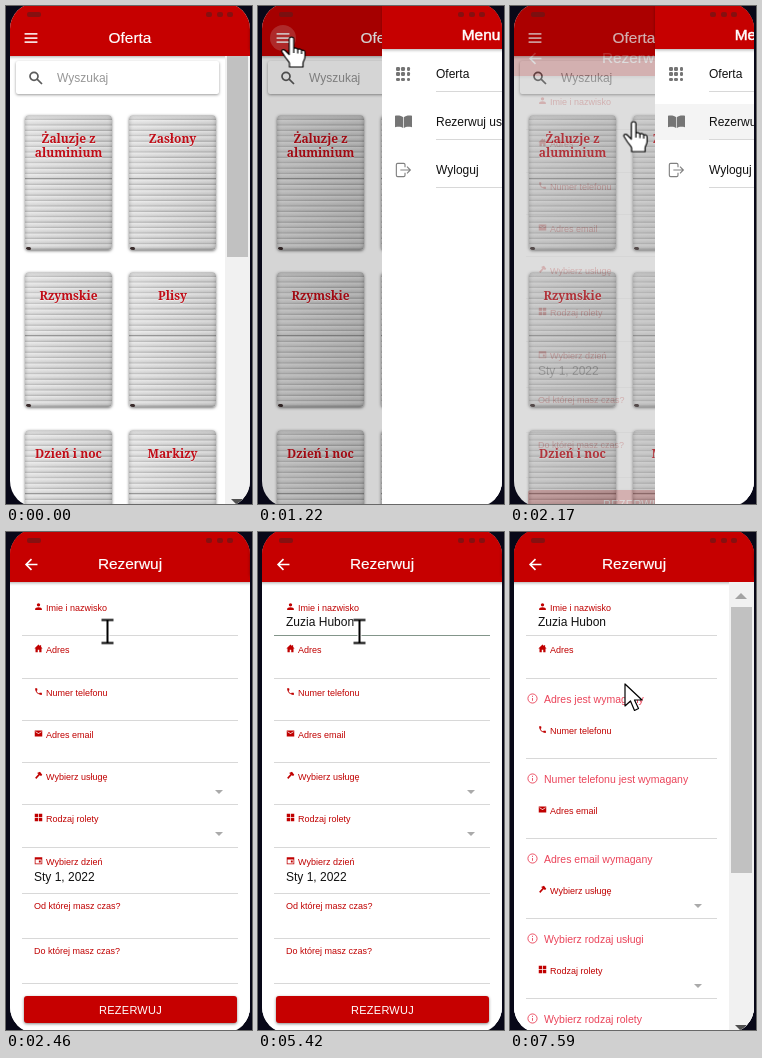
Recreate the animation shown at these times as an HTML page. Size 246 px wide and 498 px high, loop 8000 ms.

```html
<!DOCTYPE html>
<html lang="pl">
<head>
<meta charset="utf-8">
<title>Oferta</title>
<style>
@property --open { syntax: "<number>"; inherits: true; initial-value: 0; }

html, body { margin: 0; width: 100%; height: 100%; overflow: hidden; background: #080818; }
body { position: relative; font: 12px/16px "Liberation Sans", Arial, sans-serif; color: #111; }
div, svg { position: absolute; }
svg { overflow: visible; }

.phone {
  width: 246px; height: 498px; overflow: hidden;
  clip-path: inset(-3px 2px -3px 4px round 26px);
  animation: open 8s step-end infinite;
}
.page { inset: 0; background: #fff; overflow: hidden; }
.at { white-space: pre; }
.mid { transform: translateX(-50%); text-align: center; }
.header { left: 0; right: 0; top: 0; height: 50px; background: #c60000; box-shadow: 0 1px 3px #0005; }
.title { color: #fff; font-size: 15.4px; -webkit-text-stroke: .2px #fff; }
.strong { -webkit-text-stroke-width: .5px; }
.line { height: 1px; background: #d8d8d8; }

/* offer */
.search { left: 10px; top: 55px; width: 203px; height: 33px; border-radius: 2px; background: #fff; box-shadow: 0 1px 3px #0006; }
.hint { color: #979797; }
.card {
  width: 87px; height: 135px; border-radius: 4px; overflow: hidden;
  box-shadow: 0 1px 3px #0008, inset 0 0 4px #0004;
  background:
    linear-gradient(#0000 46.5%, #7779 46.5% 47.5%, #0000 47.5%),
    linear-gradient(100deg, #fff4, #fff0 45%, #0001),
    repeating-linear-gradient(#e6e6e6 0, #d2d2d2 3.2px, #b0b0b0 4.8px, #e6e6e6 5.4px);
}
.card::after { content: ""; position: absolute; left: 1px; bottom: 0; width: 5px; height: 3px; border-radius: 2px; background: #3a2c2c; }
.name { left: 0; right: 0; top: 17px; text-align: center; white-space: pre; font: bold 12px/14px "Noto Serif", serif; color: #c00d17; text-shadow: 0 1px 1px #fff9; }
.halo { left: 11.5px; top: 18.5px; width: 26px; height: 26px; border-radius: 50%; background: #fff3; animation: halo 8s step-end infinite; }
.track { left: 219px; top: 50px; width: 25px; bottom: 0; background: #f1f1f1; }
.thumb { left: 2px; width: 21px; background: #c1c1c1; }
.tri { width: 0; border: solid #0000; }

/* menu */
.dim { inset: 0; background: #000; opacity: calc(var(--open) * .27); }
.menu { left: 46px; top: 0; width: 198px; height: 498px; background: #fff; transform: translateX(calc((1 - var(--open)) * 198px)); }
.menu .header { height: 43px; }
.hover { left: 0; top: 98px; width: 198px; height: 36px; background: #f4f4f4; animation: row 8s step-end infinite; }
.status i { position: absolute; top: 5.5px; width: 6px; height: 5px; border-radius: 2px; background: #5a1a1a99; }
.status .pill { left: 21px; width: 14px; }

/* form */
.form { animation: form 8s step-end infinite; }
.errors { animation: errors 8s step-end infinite; }
.label { font-size: 9px; color: #c00000; }
.error { font-size: 10.5px; color: #eb445a; }
.focus { left: 16px; top: 103px; width: 216px; height: 1px; animation: focus 8s step-end infinite; }
.typed b { font-weight: normal; font-size: 0; animation: letter 8s step-end infinite; }
.caret { display: inline-block; width: 2px; height: 14px; margin-right: -2px; vertical-align: -3px; background: #111; animation: caret 8s step-end infinite; }
.button { left: 18px; top: 464px; width: 213px; height: 27px; border-radius: 3px; background: #c60000; box-shadow: 0 1px 3px #0007; animation: press 8s step-end infinite; }
.cta { color: #fff; font-size: 11px; letter-spacing: .25px; }

/* pointer */
.cursor { left: 0; top: 0; animation: move 8s ease-in-out infinite; }
.cursor path { stroke: #000; stroke-width: 1.2; stroke-linejoin: round; fill: #fff; }
.hand { animation: hand 8s step-end infinite; }
.beam { animation: beam 8s step-end infinite; }
.arrow { animation: errors 8s step-end infinite; }

@keyframes open {
  0% { --open: 0; } 14.375% { --open: .12; } 15.25% { --open: .606; } 16.125% { --open: .84; }
  17% { --open: .95; } 17.875% { --open: 1; }
  26.25% { --open: .86; } 27.125% { --open: .5; } 28% { --open: .18; } 28.875% { --open: .04; } 29.75%, 100% { --open: 0; }
}
@keyframes halo { 0% { opacity: 0; } 12.75% { opacity: 1; } 17.875%, 100% { opacity: 0; } }
@keyframes row { 0% { opacity: 0; } 22.2%, 100% { opacity: 1; } }
@keyframes form {
  0% { opacity: 0; transform: translateY(30px); }
  27.125% { opacity: .2; transform: translateY(20px); }
  28% { opacity: .6; transform: translateY(9px); }
  28.875% { opacity: .9; transform: translateY(3px); }
  29.75%, 100% { opacity: 1; transform: none; }
}
@keyframes errors { 0% { opacity: 0; } 80.375%, 100% { opacity: 1; } }
@keyframes focus { 0% { background: #0000; } 35.75% { background: #c4383a; } 44.375%, 100% { background: #83958a; } }
@keyframes letter { 0% { font-size: 12px; } 45%, 100% { font-size: 0; } }
@keyframes caret {
  0% { opacity: 0; } 35.75% { opacity: 1; } 42.625% { opacity: 0; } 44.375% { opacity: 1; }
  67.75% { opacity: 0; } 74.5%, 100% { opacity: 1; }
}
@keyframes press { 0% { background: #c60000; } 76.375%, 100% { background: #cb1414; } }
@keyframes hand { 0% { opacity: 1; } 29.75% { opacity: 0; } 76.375% { opacity: 1; } 80.375%, 100% { opacity: 0; } }
@keyframes beam { 0% { opacity: 0; } 29.75% { opacity: 1; } 76.375%, 100% { opacity: 0; } }
@keyframes move {
  0%, 3.9% { transform: translate(196px, 503px); }
  13.6%, 16.1% { transform: translate(33.5px, 31px); }
  23.9%, 26.25% { transform: translate(125.5px, 117px); }
  30.75%, 70.8% { transform: translate(101.5px, 99.5px); }
  74.5%, 76.2% { transform: translate(122px, 452px); }
  78.5%, 87% { transform: translate(127px, 488px); }
  89.75%, 91.2% { transform: translate(98px, 135px); }
  93.2% { transform: translate(111px, 158px); }
  94.8%, 100% { transform: translate(115px, 152px); }
}
</style>
</head>
<body>
<div class="phone">
  <div class="page" id="offer"></div>
  <div class="page form" id="form"></div>
  <div class="page errors" id="errors"></div>
  <div class="dim"></div>
  <div class="menu" id="menu"></div>
  <div class="status">
    <i class="pill"></i><i style="left:200px"></i><i style="left:211px"></i><i style="left:221px"></i>
  </div>
</div>
<div class="cursor">
  <svg class="hand" width="1" height="1">
    <path d="M-2.300 2.300a2.300 2.300 0 0 1 4.600 0V11.500c1.500-1 3.500-.5 4 1 1.500-1 3.300-.5 3.800 1 1.500-.7 3.400 0 3.400 2V20c0 3-2 4-2 6.500V30H-2v-3.500c0-2-3-4-5-7.500l-2.500-4c-1-2 1.500-3.500 3.200-1.500l4 4z"/>
    <path d="M2.300 12v4M6.300 13v3.500M10.100 14v3"/>
  </svg>
  <svg class="beam" width="1" height="1">
    <path d="M-6-11.5H6M0-11.5V11.5M-6 11.5H6" style="stroke:#fff;stroke-width:4"/>
    <path d="M-6-11.5H6M0-11.5V11.5M-6 11.5H6" style="stroke-width:2"/>
  </svg>
  <svg class="arrow" width="1" height="1">
    <path d="M0 0v22l5.500-5 4 9.500 4-2-4-8.500h7.500z"/>
  </svg>
</div>

<script>
// Icons on a 24-unit grid
const icons = {
  person: 'M12 12a4.500 4.500 0 1 0 0-9 4.500 4.500 0 0 0 0 9zm0 2c-5 0-9 2-9 5v2h18v-2c0-3-4-5-9-5z',
  home: 'M10 22v-7h4v7h6V12h3l-4-4V3h-3v2l-4-4L1 12h3v10z',
  phone: 'M6.600 10.800c1.400 2.800 3.800 5.100 6.600 6.600l2.200-2.200c.3-.3.7-.4 1-.2 1.100.4 2.300.6 3.600.6.6 0 1 .4 1 1V20c0 .6-.4 1-1 1C10.600 21 3 13.400 3 4c0-.6.4-1 1-1h3.500c.6 0 1 .4 1 1 0 1.200.2 2.400.6 3.600.1.3 0 .7-.2 1z',
  mail: 'M2 4h20v16H2zM4 8l8 5 8-5V6l-8 5-8-5z',
  hammer: 'M8 5l8-3 6 8-3 3-4-2L6 21l-3-3 9-10z',
  grid: 'M2 2h9v9H2zM13 2h9v9h-9zM2 13h9v9H2zM13 13h9v9h-9z',
  date: 'M2 3h20v19H2zM4 9h16v11H4zM13 12h5v5h-5z',
  book: 'M0 4c5-1 9 0 11.500 2v15c-3-2-7-2-11.500-1zM24 4c-5-1-9 0-11.500 2v15c3-2 7-2 11.500-1z'
};
const strokes = {
  exit: 'M15 8V4q0-2-2-2H4Q2 2 2 4v16q0 2 2 2h9q2 0 2-2v-4M8 12h15M18 7l5 5-5 5',
  search: 'M15 9.500a6 6 0 1 1-12 0 6 6 0 0 1 12 0zM14 14l7 7',
  info: 'M22 12a10 10 0 1 1-20 0 10 10 0 0 1 20 0zM12 11v6M12 6v2.500',
  bars: 'M1 5h22M1 12h22M1 19h22',
  back: 'M23 12H2M12 2L2 12l10 10'
};

// Helpers: x is the left edge (or the middle), y the middle of the line
const at = (x, y, cls, text) => `<div class="at ${cls}" style="left:${x}px;top:${y - 8}px">${text}</div>`;
const icon = (name, x, y, size, color, weight = 2) => {
  const paint = icons[name]
    ? `fill="${color}" fill-rule="evenodd"`
    : `fill="none" stroke="${color}" stroke-width="${weight}"`;
  return `<svg viewBox="0 0 24 24" width="${size}" height="${size}" style="left:${x - size / 2}px;top:${y - size / 2}px"><path d="${icons[name] || strokes[name]}" ${paint}/></svg>`;
};
const line = (x, y, w) => `<div class="line" style="left:${x}px;top:${y}px;width:${w}px"></div>`;
const tri = (x, y, w, h, color, up) => {
  const sides = up ? `0 ${w}px ${h}px` : `${h}px ${w}px 0`;
  return `<div class="tri" style="left:${x - w}px;top:${y - h / 2}px;border-width:${sides};border-${up ? 'bottom' : 'top'}-color:${color}"></div>`;
};
const header = (title, x, y = 32, cls = '') => `<div class="header"></div>` + at(x, y, `mid title ${cls}`, title);
const scrollbar = (top, height) =>
  `<div class="track"><div class="thumb" style="top:${top - 50}px;height:${height}px"></div></div>` +
  tri(231, 496, 6, 6, '#505050');
const label = (name, text, y) => name
  ? icon(name, 32.5, y - 1.5, 9, '#c00000') + at(40, y, 'label', text)
  : at(28, y, 'label', text);
const fill = (id, ...parts) => { document.getElementById(id).innerHTML = parts.flat().join(''); };

const cards = ['Żaluzje z\naluminium', 'Zasłony', 'Rzymskie', 'Plisy', 'Dzień i noc', 'Markizy'];
fill('offer',
  header('Oferta', 124),
  '<div class="halo"></div>',
  icon('bars', 25, 32, 14, '#f6dede', 3),
  '<div class="search"></div>',
  icon('search', 30, 72, 16, '#5c5c5c', 2.6),
  at(51, 72, 'hint', 'Wyszukaj'),
  cards.map((name, i) =>
    `<div class="card" style="left:${19 + i % 2 * 104}px;top:${Math.floor(109 + (i >> 1) * 157.5)}px"><div class="name">${name}</div></div>`),
  scrollbar(50, 201));

const dots = [0, 1, 2].flatMap(r => [0, 1, 2].map(c =>
  `<div style="left:${14 + c * 5.3}px;top:${61 + r * 5.3}px;width:3.6px;height:3.6px;border-radius:1.2px;background:#757575"></div>`));
fill('menu',
  header('Menu', 99, 28.5, 'strong'),
  '<div class="hover"></div>',
  dots,
  icon('book', 21, 115.5, 17, '#757575'),
  icon('exit', 21, 163.5, 16, '#808080', 1.7),
  ['Oferta', 'Rezerwuj usługę', 'Wyloguj'].map((text, i) =>
    at(54, 68 + i * 48, '', text) + line(54, 85 + i * 48, 144)));

// icon, label, label height, underline height
const fields = [
  ['person', 'Imie i nazwisko', 76, 103],
  ['home', 'Adres', 118, 146],
  ['phone', 'Numer telefonu', 161, 188],
  ['mail', 'Adres email', 203, 230],
  ['hammer', 'Wybierz usługę', 245, 272],
  ['grid', 'Rodzaj rolety', 287, 315],
  ['date', 'Wybierz dzień', 330, 361],
  ['', 'Od której masz czas?', 374, 406],
  ['', 'Do której masz czas?', 419, 451]
];
const client = 'Zuzia Hubon';
const keyTimes = [3550, 3620, 3690, 3890, 3960, 4130, 4330, 4530, 4600, 4800, 4870];
const letters = [...client].map((c, i) => `<b style="animation-delay:${keyTimes[i]}ms">${c}</b>`).join('');
fill('form',
  header('Rezerwuj', 124),
  icon('back', 25, 32, 13, '#fff', 3),
  fields.map(([name, text, y, base]) => label(name, text, y) + line(16, base, 216)),
  '<div class="focus"></div>',
  at(28, 90, 'typed', letters + '<span class="caret"></span>'),
  tri(213, 260, 4, 4, '#aaa'),
  tri(213, 302, 4, 4, '#aaa'),
  at(28, 345, '', 'Sty 1, 2022'),
  '<div class="button"></div>',
  at(124.5, 477.5, 'mid cta', 'REZERWUJ'));

const messages = ['Adres jest wymagany', 'Numer telefonu jest wymagany', 'Adres email wymagany', 'Wybierz rodzaj usługi', 'Wybierz rodzaj rolety'];
fill('errors',
  header('Rezerwuj', 124),
  icon('back', 25, 32, 13, '#fff', 3),
  label('person', 'Imie i nazwisko', 76),
  at(28, 90, '', client),
  line(16, 103, 191),
  messages.map((text, i) => {
    const y = 118 + i * 80;
    return label(fields[i + 1][0], fields[i + 1][1], y + (i ? 1 : 0)) + line(16, y + 28, 191) +
      icon('info', 22, y + 48, 11, '#eb445a') + at(34, y + 48.5, 'error', text) +
      (i > 2 ? tri(188, y + 16, 4, 4, '#aaa') : '');
  }),
  scrollbar(75, 266),
  tri(231, 64, 6, 6, '#a3a3a3', true));
</script>
</body>
</html>
```
